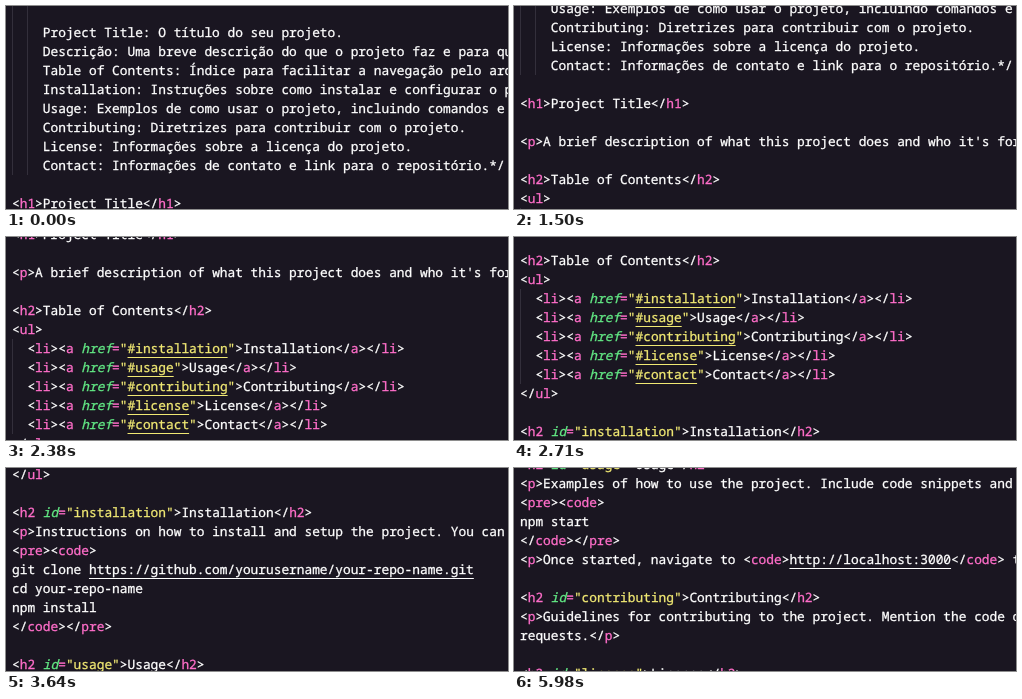
An HTML page that plays this animation: 502 by 203 pixels, repeating every 7.36 s.

```html
<!DOCTYPE html>
<html lang="en">
<head>
<meta charset="utf-8">
<title>README scroll</title>
<style>
  html, body { margin: 0; width: 100%; height: 100%; overflow: hidden; background: #1a1621; }
  #stage { position: relative; width: 100%; height: 100%; overflow: clip; contain: strict; }
  #page {
    position: absolute; left: 0; top: 17px; padding-left: 6px;
    font: 12.8333px/19px "Noto Sans Mono", monospace;
    font-variant-ligatures: none; text-rendering: geometricPrecision;
    -webkit-text-stroke: 0.3px currentColor;
    white-space: pre; color: #fff;
    animation: scroll 7360ms step-end infinite;
  }
  .line { height: 19px; }
  .tag, .eq { color: #ff6ec9; }
  .attr { color: #62e884; font-style: italic; }
  .str { color: #f0e873; }
  u { text-decoration-thickness: 1px; text-underline-offset: 4px; text-decoration-skip-ink: none; }
  .guide { position: absolute; width: 1px; background: #332f3b; }
  /* each wheel notch moves the view 50px */
  @keyframes scroll {
    0% { transform: translateY(0); }
    11.41% { transform: translateY(-50px); }
    20.38% { transform: translateY(-100px); }
    23.37% { transform: translateY(-150px); }
    32.33% { transform: translateY(-200px); }
    36.82% { transform: translateY(-250px); }
    40.35% { transform: translateY(-300px); }
    44.02% { transform: translateY(-350px); }
    49.45% { transform: translateY(-400px); }
    76.63% { transform: translateY(-450px); }
    79.34% { transform: translateY(-500px); }
    80.29% { transform: translateY(-550px); }
    81.25%, 100% { transform: translateY(-600px); }
  }
</style>
</head>
<body>
<div id="stage"><div id="page"></div></div>
<script>
const text = `    Project Title: O título do seu projeto.
    Descrição: Uma breve descrição do que o projeto faz e para quem se destina.
    Table of Contents: Índice para facilitar a navegação pelo arquivo.
    Installation: Instruções sobre como instalar e configurar o projeto.
    Usage: Exemplos de como usar o projeto, incluindo comandos e opções.
    Contributing: Diretrizes para contribuir com o projeto.
    License: Informações sobre a licença do projeto.
    Contact: Informações de contato e link para o repositório.*/

<h1>Project Title</h1>

<p>A brief description of what this project does and who it's for</p>

<h2>Table of Contents</h2>
<ul>
  <li><a href="#installation">Installation</a></li>
  <li><a href="#usage">Usage</a></li>
  <li><a href="#contributing">Contributing</a></li>
  <li><a href="#license">License</a></li>
  <li><a href="#contact">Contact</a></li>
</ul>

<h2 id="installation">Installation</h2>
<p>Instructions on how to install and setup the project. You can use:</p>
<pre><code>
git clone https://github.com/yourusername/your-repo-name.git
cd your-repo-name
npm install
</code></pre>

<h2 id="usage">Usage</h2>
<p>Examples of how to use the project. Include code snippets and commands.</p>
<pre><code>
npm start
</code></pre>
<p>Once started, navigate to <code>http://localhost:3000</code> to view it.</p>

<h2 id="contributing">Contributing</h2>
<p>Guidelines for contributing to the project. Mention the code of conduct and pull
requests.</p>

<h2 id="license">License</h2>`;

const page = document.getElementById('page');
const span = (cls, s) => `<span class="${cls}">${s}</span>`;

function attribute(name, value) {
  const shown = value.startsWith('#') ? `<u>${value}</u>` : value;
  return ' ' + span('attr', name) + span('eq', '=') + span('str', `"${shown}"`);
}

function highlight(line) {
  return line
    .replace(/https?:[^\s<]+/g, '\u0001$&\u0002')
    .replace(/<(\/?)(\w+)(?: (\w+)="([^"]*)")?>/g, (_, slash, tag, name, value) =>
      '&lt;' + slash + span('tag', tag) + (name ? attribute(name, value) : '') + '&gt;')
    .replace(/\u0001/g, '<u>').replace(/\u0002/g, '</u>');
}

page.innerHTML = text.split('\n')
  .map(line => `<div class="line">${highlight(line)}</div>`).join('');

function guide(x, from, to) {
  const el = document.createElement('div');
  el.className = 'guide';
  el.style.cssText = `left:${x}px;top:${from * 19}px;height:${(to - from) * 19}px`;
  page.append(el);
}
guide(6, -1, 8);
guide(21, -1, 8);
guide(6, 15, 20);
</script>
</body>
</html>
```
